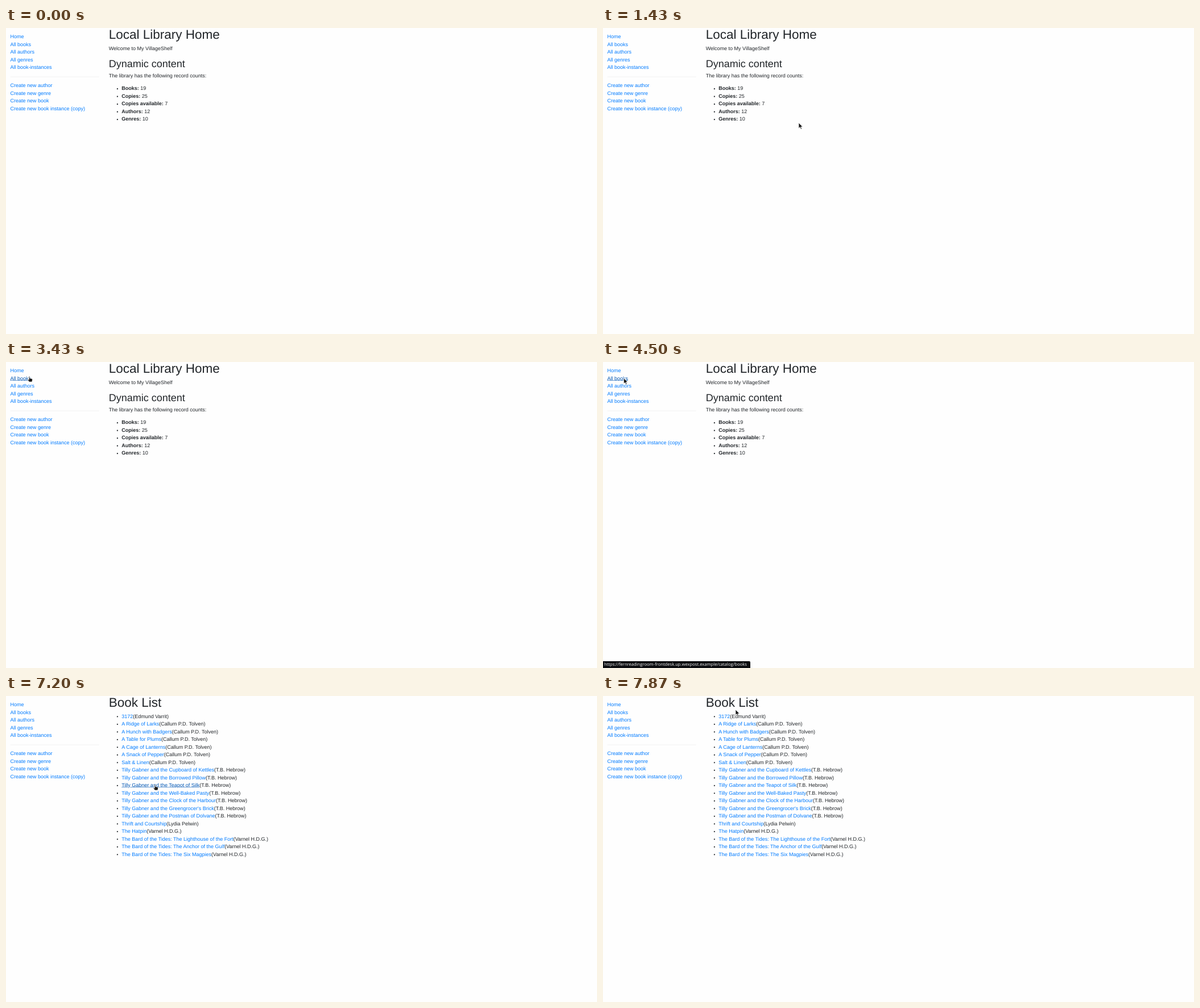
An HTML page that plays this animation: 1039 px wide and 539 px high, repeating every 8 s.

```html
<!DOCTYPE html>
<html lang="en">
<head>
<meta charset="utf-8">
<title>Library catalogue</title>
<style>
html, body { margin: 0; width: 100%; height: 100%; overflow: hidden; background: #fefefe; }
#page {
  position: absolute; left: -.7px; top: -2px; width: 1848px; height: 965px;
  transform: scale(.5625); transform-origin: 0 0;
  font: 16px/24px "Liberation Sans", Arial, sans-serif; color: #212529;
  text-rendering: geometricPrecision; white-space: nowrap;
}
nav, section { position: absolute; top: 0; }
nav { left: 15px; width: 278px; }
section { left: 323px; }
h1, h2 { margin: 0 0 8px; font-weight: 400; line-height: 1.2; }
h1 { font-size: 40px; }
h2 { font-size: 32px; }
p, ul { margin: 0 0 16px; }
ul { padding-left: 40px; }
nav ul { padding: 0; list-style: none; }
nav ul:first-child { margin-top: 20px; }
hr { margin: 16px 0; border: 0; border-top: 1px solid rgba(0, 0, 0, .1); }
a { color: #007bff; }
a.hover { color: #0056b3; text-decoration: underline; }
#status {
  position: absolute; left: 0; top: 527px; height: 12px; min-width: 254.5px; padding: 0 2px;
  background: #0c0d10; color: #f2f2f2; border-top-right-radius: 2px; white-space: nowrap;
  font: 7.62px/13px "Open Sans", "Noto Sans", sans-serif; text-rendering: geometricPrecision;
}
#cursor { position: absolute; left: 0; top: 0; width: 16px; height: 16px; overflow: visible; }
#cursor path { fill: #161616; stroke: #fff; stroke-width: .7; stroke-linejoin: round; }
#status, #cursor { pointer-events: none; }
</style>
</head>
<body>
<div id="page">
  <nav></nav>
  <section id="home">
    <h1>Local Library Home</h1>
    <p>Welcome to My VillageShelf</p>
    <h2>Dynamic content</h2>
    <p>The library has the following record counts:</p>
    <ul></ul>
  </section>
  <section id="books">
    <h1>Book List</h1>
    <ul></ul>
  </section>
</div>
<div id="status"></div>
<svg id="cursor">
  <path id="arrow" d="M0 0V9.7L2.3 7.6L3.9 11.2L5.5 10.5L4 7.1H7Z"/>
  <path id="hand" d="M-.8 .4Q0 -.6 .8 .4V3.6L4.6 4.4Q5.6 4.8 5.5 6L4.8 10H-.4L-2.8 6.4Q-2.8 5.2 -1.6 5.7L-.8 6.5Z"/>
</svg>
<script>
const LOOP = 8000;
const $ = s => document.querySelector(s);
const show = (el, on) => { el.style.display = on ? '' : 'none'; };
const items = (rows, f) => rows.map(r => `<li>${f(r)}</li>`).join('');
const link = s => `<a>${s}</a>`;

const menus = [
  ['Home', 'All books', 'All authors', 'All genres', 'All book-instances'],
  ['Create new author', 'Create new genre', 'Create new book', 'Create new book instance (copy)']
];
const counts = [['Books', 19], ['Copies', 25], ['Copies available', 7], ['Authors', 12], ['Genres', 10]];
const hero = s => 'Tilly Gabner and the ' + s;
const saga = s => 'The Bard of the Tides: The ' + s;
const shelf = [
  ['Edmund Varrit', ['3172']],
  ['Callum P.D. Tolven', ['A Ridge of Larks', 'A Hunch with Badgers', 'A Table for Plums',
    'A Cage of Lanterns', 'A Snack of Pepper', 'Salt &amp; Linen']],
  ['T.B. Hebrow', ['Cupboard of Kettles', 'Borrowed Pillow', 'Teapot of Silk', 'Well-Baked Pasty',
    'Clock of the Harbour', "Greengrocer's Brick", 'Postman of Dolvane'].map(hero)],
  ['Lydia Pelwin', ['Thrift and Courtship']],
  ['Varnel H.D.G.', ['The Hatpin', ...['Lighthouse of the Fort', 'Anchor of the Gulf', 'Six Magpies'].map(saga)]]
];
const books = shelf.flatMap(([author, titles]) => titles.map(t => [t, author]));

$('nav').innerHTML = menus.map(m => `<ul>${items(m, link)}</ul>`).join('<hr>');
$('#home ul').innerHTML = items(counts, ([k, n]) => `<b>${k}:</b> ${n}`);
$('#books ul').innerHTML = items(books, ([t, a]) => `${link(t)}(${a})`);

// Pointer moves: start, end, steps, points passed at even intervals
const moves = [
  [170, 970, 24, [[300, 1], [190, 120], [56, 230], [170, 298], [400, 270], [467, 190], [446, 119]]],
  [1000, 1800, 23, [[444, 119], [395, 138], [344, 167], [346, 179], [350, 188]]],
  [1830, 2430, 19, [[342, 184], [200, 108], [70, 36], [28.5, 9]]],
  [3170, 3430, 9, [[30, 10], [36, 17], [41, 25]]],
  [4500, 4500, 1, [[36.5, 28.5]]],
  [6270, 6500, 8, [[139, 24], [205, 105], [266, 183]]],
  [7200, 7870, 21, [[262, 156], [252, 90], [233, 24]]]
];

// Status bar: from, to, path
const host = 'https://fernreadingroom-frontdesk.up.wexpost.example/catalog/';
const notes = [
  [4500, 6370, 'books'],
  [7260, 7600, 'book/7c40e19ab25d83f06e1b94a2']
];

function along(pts, u) {
  const last = pts.length - 1;
  const i = Math.min(Math.floor(u * last), Math.max(last - 1, 0));
  const f = u * last - i;
  const at = k => pts[Math.max(0, Math.min(last, k))];
  return [0, 1].map(d => {
    const [a, b, c, e] = [-1, 0, 1, 2].map(k => at(i + k)[d]);
    return b + f / 2 * (c - a + f * (2 * a - 5 * b + 4 * c - e + f * (3 * (b - c) + e - a)));
  });
}

function pointer(t) {
  const move = moves.filter(m => t >= m[0]).pop();
  if (!move) return null;
  const [from, to, steps, pts] = move;
  if (steps === 1 || t >= to) return pts[pts.length - 1];
  return along(pts, Math.floor((t - from) / (to - from) * (steps - 1)) / (steps - 1));
}

let hovered = null;
function draw(t) {
  const listing = t >= 6270;
  show($('#home'), !listing);
  show($('#books'), listing);

  const pos = pointer(t);
  show($('#cursor'), pos);
  const hit = pos && document.elementFromPoint(...pos);
  const over = hit && hit.closest('a');
  if (over !== hovered) {
    if (hovered) hovered.classList.remove('hover');
    if (over) over.classList.add('hover');
    hovered = over;
  }
  if (pos) {
    const hand = over && !(t >= 4500 && t < 6270);
    show($('#hand'), hand);
    show($('#arrow'), !hand);
    $('#cursor').style.transform = `translate(${pos[0]}px, ${pos[1]}px)`;
  }

  const note = notes.find(n => t >= n[0] && t < n[1]);
  show($('#status'), note);
  if (note) $('#status').textContent = host + note[2];
}

const start = performance.now();
function tick() {
  draw((performance.now() - start) % LOOP);
  requestAnimationFrame(tick);
}
tick();
</script>
</body>
</html>
```
